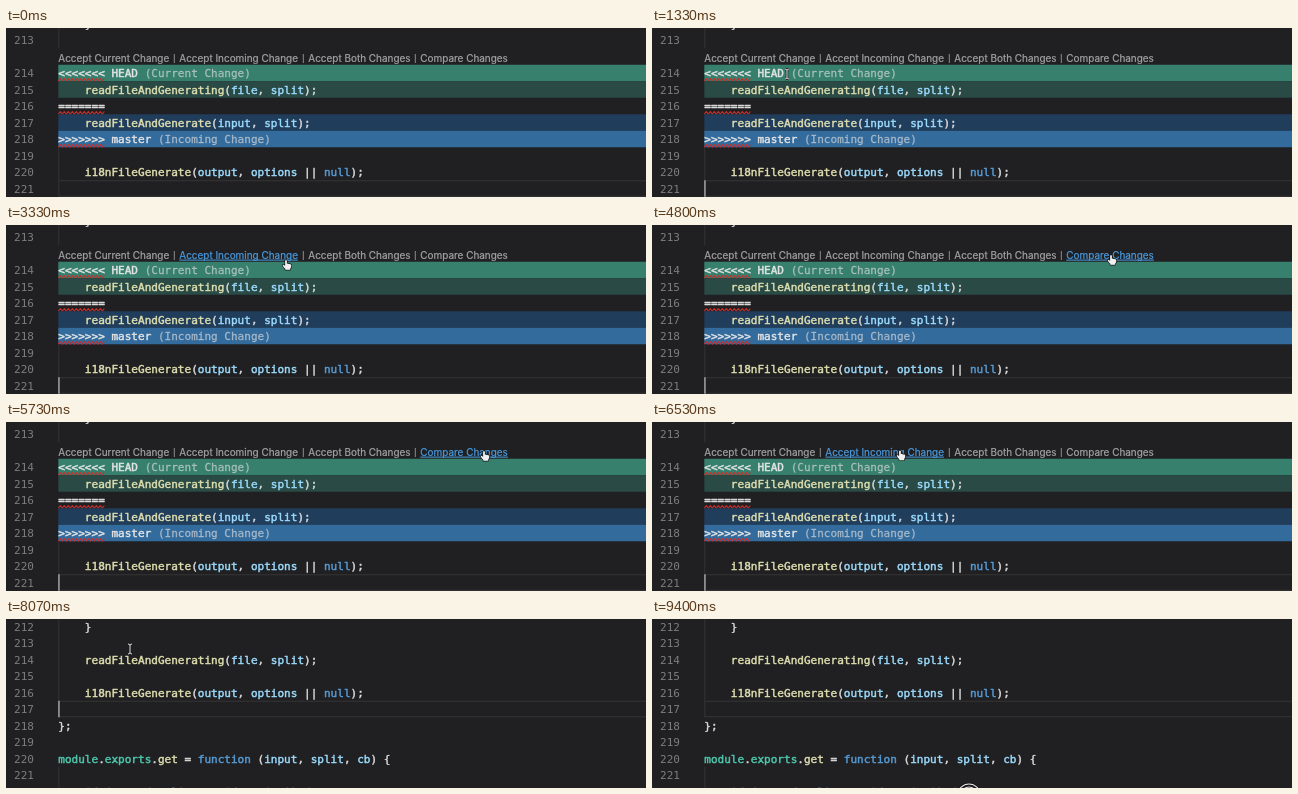
These frames come from a looping animation (640 by 169 pixels, 9470 ms). An HTML page with a canvas:

```html
<!DOCTYPE html>
<html lang="en">
<head>
<meta charset="utf-8">
<title>Merge conflict</title>
<style>
html, body { margin: 0; width: 100%; height: 100%; overflow: hidden; background: #202022; }
canvas { display: block; width: 640px; height: 169px; }
</style>
</head>
<body>
<canvas id="stage"></canvas>
<script>
const W = 640, H = 169, LOOP = 9470, LINE = 16.5, LEFT = 52.3;
const ACCEPTED = 7200, CLEANED = 7530, CARET_RESET = 6850;
const CODE = '11.04px "DejaVu Sans Mono", monospace';
const LENS = '9.95px Inter, sans-serif';

const canvas = document.getElementById('stage');
const ctx = canvas.getContext('2d');
const ratio = window.devicePixelRatio || 1;
canvas.width = W * ratio;
canvas.height = H * ratio;
ctx.scale(ratio, ratio);
ctx.lineJoin = 'round';

// A leading space marks a line inside a block, which gets an indent guide.
const conflict = {
  top: 12, active: 221, lensX: LEFT,
  lines: [
    '    }',
    ' ',
    '<<<<<<< HEAD',
    '    readFileAndGenerating(file, split);',
    '=======',
    '    readFileAndGenerate(input, split);',
    '>>>>>>> master',
    ' ',
    '    i18nFileGenerate(output, options || null);',
    ' '
  ],
  bands: { 214: '#37806e', 215: '#294a45', 217: '#203d5c', 218: '#336b9d' },
  notes: { 214: '(Current Change)', 218: '(Incoming Change)' },
  errors: { 214: 7, 216: 7, 218: 7 }
};
const merged = [
  '    }',
  ' ',
  '    readFileAndGenerating(file, split);',
  ' ',
  '    i18nFileGenerate(output, options || null);',
  ' ',
  '};',
  '',
  'module.exports.get = function (input, split, cb) {',
  ' ',
  "    if (typeof split === 'function') {"
];
const accepted = {
  top: 12, active: 217, lensX: 79, lines: merged,
  bands: { 214: '#37806e', 215: '#3c87b2' },
  notes: { 214: '(Current Change)' },
  errors: { 214: 7, 215: 1 }
};
const clean = {
  top: 24, active: 217, lensX: null, lines: merged,
  bands: {}, notes: {}, errors: {}
};

const lenses = [
  ['Accept Current Change', 0, 112],
  ['Accept Incoming Change', 121, 120],
  ['Accept Both Changes', 250, 103],
  ['Compare Changes', 362, 88]
];

// Pointer path: time, x, y
const path = [
  [500, 165, 185], [1150, 135, 46], [1450, 135, 46], [1800, 120, 33],
  [2500, 136, 33], [3330, 280, 35], [3550, 281, 35], [4050, 365, 32],
  [4800, 459, 30], [5730, 478, 29], [6050, 478, 29], [6850, 124, 28],
  [7270, 124, 28], [8100, 124, 30], [9300, 317, 172], [LOOP, 317, 172]
];

function pointerAt(t) {
  if (t < path[0][0]) return null;
  const i = path.findIndex(p => p[0] > t);
  const [t0, x0, y0] = path[i - 1], [t1, x1, y1] = path[i];
  const u = (t - t0) / (t1 - t0), k = u * u * (3 - 2 * u);
  return { x: x0 + (x1 - x0) * k, y: y0 + (y1 - y0) * k };
}

function rect(x, y, w, h, color) {
  ctx.fillStyle = color;
  ctx.fillRect(x, y, w, h);
}

// A positive weight thickens the strokes of the letters.
function text(str, x, y, color, weight = 0, font = CODE) {
  ctx.font = font;
  ctx.fillStyle = ctx.strokeStyle = color;
  ctx.fillText(str, x, y);
  if (!weight) return;
  ctx.lineWidth = weight;
  ctx.strokeText(str, x, y);
}

function tokenColor(token, next) {
  if (/^'/.test(token)) return '#ce9178';
  if (!/^\w/.test(token)) return '#dcdcdc';
  if (token === 'if') return '#c586c0';
  if (/^(function|typeof|null)$/.test(token)) return '#569cd6';
  if (/^(module|exports)$/.test(token)) return '#4ec9b0';
  if (token === 'get' || next === '(') return '#dfdfb0';
  return '#9cdcfe';
}

function drawCode(line, y, charW) {
  if (/^[<=>]{7}/.test(line)) return text(line, LEFT, y, '#e4e4e4', .45);
  for (const m of line.matchAll(/'[^']*'|\w+|[^\w\s']+/g)) {
    const color = tokenColor(m[0], line[m.index + m[0].length]);
    text(m[0], LEFT + m.index * charW, y, color, .45);
  }
}

function squiggle(y, width) {
  ctx.beginPath();
  for (let x = 0; x <= width; x += 2) ctx.lineTo(LEFT + x, y + (x % 4 ? -1.3 : 1.3));
  ctx.strokeStyle = '#c4302c';
  ctx.lineWidth = 1.1;
  ctx.stroke();
}

function drawEditor(doc, t) {
  ctx.font = CODE;
  const charW = ctx.measureText('0').width;
  doc.lines.forEach((line, i) => {
    const n = 212 + i;
    const lensGap = doc.lensX !== null && n > 213 ? 1 : 0;
    const mid = doc.top + LINE * (n - 213 + lensGap);
    const top = mid - LINE / 2;
    const base = mid + 4;

    if (doc.bands[n]) rect(LEFT, top, W - LEFT, LINE, doc.bands[n]);
    else if (line[0] === ' ') rect(LEFT, top, 1, LINE, '#343436');
    if (n === doc.active) {
      rect(LEFT, top, W - LEFT, 1, '#343436');
      rect(LEFT, top + LINE - 1, W - LEFT, 1, '#343436');
      const phase = t < CARET_RESET ? t + 680 : t - CARET_RESET;
      if (phase % 1000 < 500) rect(LEFT, top, 1.3, LINE, '#b4b4b2');
    }
    text(String(n), 8, base, '#7d7d7f');
    drawCode(line, base, charW);
    if (doc.notes[n]) {
      text(doc.notes[n], LEFT + (line.length + 1) * charW, base, 'rgba(222,222,222,.6)', .3);
    }
    if (doc.errors[n]) squiggle(mid + 6.8, doc.errors[n] * charW);
  });
}

// Returns whether the pointer is over a link.
function drawLenses(x, pointer) {
  let hit = false;
  lenses.forEach(([label, dx, width], i) => {
    const left = x + dx;
    const over = pointer && pointer.y > 23 && pointer.y < 38 &&
      pointer.x >= left && pointer.x <= left + width;
    const color = over ? '#4a9be0' : '#a4a4a4';
    if (i) rect(left - 5.5, 26, 1, 9, '#8c8c8c');
    text(label, left, 33.5, color, .2, LENS);
    if (over) rect(left, 34.6, ctx.measureText(label).width, 1, color);
    hit = hit || over;
  });
  return hit;
}

const hand = new Path2D('M-1 .8Q0-.6 1 .8V4.2Q2 3.6 2.8 4.5Q3.8 4 4.4 4.9' +
  'Q6 4.6 6 6.2Q6.1 8.4 4.8 9.8V11.2H-.8V10Q-2.4 8.4-3.6 6.4Q-3.6 5-2.2 5.6L-1 6.8Z');
const beam = new Path2D('M-2-5Q0-5 0-3.5Q0-5 2-5M0-3.5V3.5M-2 5Q0 5 0 3.5Q0 5 2 5');
const ring = new Path2D('M-11 4a11 11 0 0 1 22 0M-8 4a8 8 0 0 1 16 0');

function outlined(shape, dark, light) {
  ctx.strokeStyle = '#151515';
  ctx.lineWidth = dark;
  ctx.stroke(shape);
  ctx.strokeStyle = '#e8e8e8';
  ctx.lineWidth = light;
  ctx.stroke(shape);
}

function drawPointer({ x, y }, isHand, isClick) {
  ctx.save();
  ctx.translate(x, y);
  if (isHand) {
    ctx.scale(.88, .88);
    ctx.fillStyle = '#f0f0f0';
    ctx.strokeStyle = '#151515';
    ctx.lineWidth = 1.5;
    ctx.stroke(hand);
    ctx.fill(hand);
  } else if (isClick) {
    outlined(ring, 2.4, 1.1);
  } else {
    outlined(beam, 2.4, 1);
  }
  ctx.restore();
}

function draw(t) {
  const doc = t < ACCEPTED ? conflict : t < CLEANED ? accepted : clean;
  const pointer = pointerAt(t);
  rect(0, 0, W, H, '#202022');
  drawEditor(doc, t);
  const overLink = doc.lensX !== null && drawLenses(doc.lensX, pointer);
  if (pointer) drawPointer(pointer, overLink, t > 9250);
}

const start = performance.now();
function tick() {
  draw((performance.now() - start) % LOOP);
  requestAnimationFrame(tick);
}
tick();
</script>
</body>
</html>
```
